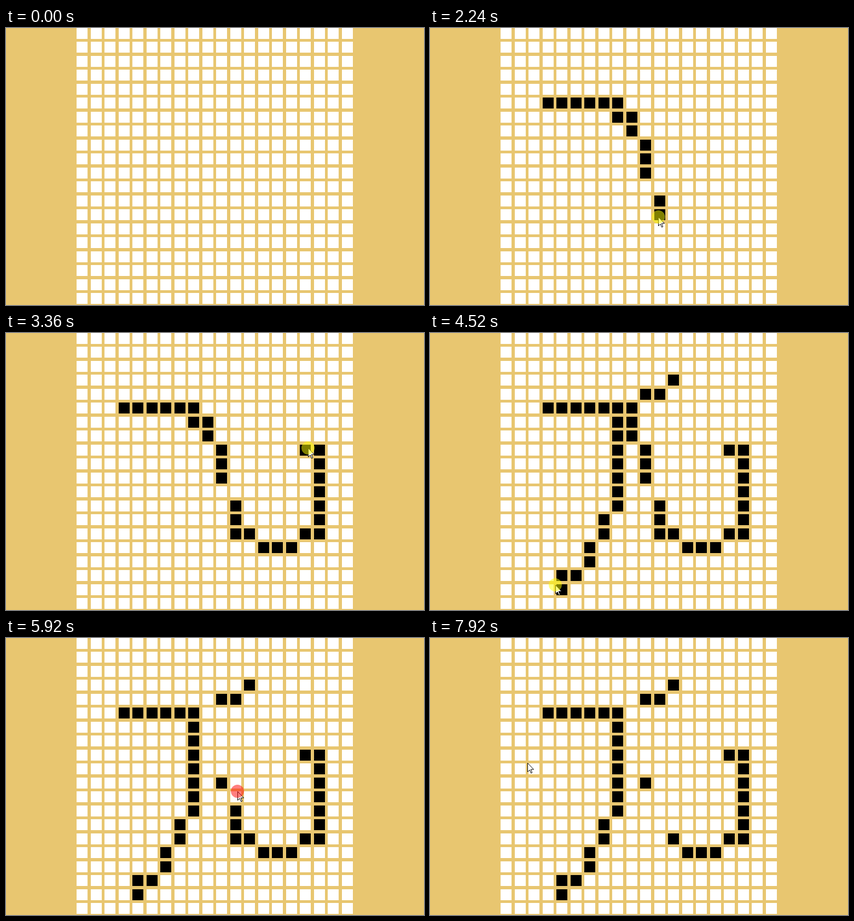
These frames come from a looping animation (764 by 506 pixels, 8 s). An HTML page with a canvas:

```html
<!DOCTYPE html>
<html lang="en">
<head>
<meta charset="utf-8">
<title>Pixel drawing</title>
<style>
  html, body { margin: 0; width: 100%; height: 100%; overflow: hidden; background: #e8c670; }
  canvas { display: block; }
</style>
</head>
<body>
<canvas id="stage" width="764" height="506"></canvas>
<script>
const ctx = document.getElementById('stage').getContext('2d');
const LOOP = 8000, TICK = 40, SAMPLE = 4;
const COUNT = 20, PITCH = 25.5, SIZE = 20, LEFT = 129.2, TOP = -0.4;

const pen = { fill: '#000', glow: 'rgba(255,255,0,.5)' };
const eraser = { fill: '#fff', glow: 'rgba(255,0,0,.5)' };

// Pointer legs in grid units: whole numbers are cell centres. The pointer rests between legs.
const legs = [
  { from: 240, to: 1040, power: 2, d: 'M18.8 17.9Q12 12 3.13 5.27' },
  { from: 1400, to: 1600, tool: pen, d: 'M3.13 5.27L5.03 4.8' },
  { from: 1600, to: 2240, tool: pen,
    d: 'M5.03 4.8L8 5L8.3 6L9.3 7L9.8 8L10.35 10L10.5 11.5L10.91 13.15' },
  { from: 2240, to: 3360, tool: pen, power: 1.3,
    d: 'M10.91 13.15L11.1 14L12 14.25L13 14.9L15 14.8L16 14L17.2 13.8L17.35 10L17.2 8L16.19 7.86' },
  { from: 3400, to: 4060, d: 'M16.19 7.86Q12 3 9.8 2.6L12.1 3.1' },
  { from: 4060, to: 4520, tool: pen,
    d: 'M12.1 3.1L11 4L10 4.2L8 6V12L7 13V14L6 15V16L5 17L4 17.3V17.75L3.52 17.66' },
  { from: 4600, to: 4800, d: 'M3.52 17.66L6.23 8.21' },
  { from: 4800, to: 5160, d: 'M6.23 8.21Q7.5 3.3 9 3.3' },
  { from: 5160, to: 5920, tool: eraser, d: 'M9 3.3L9.05 7.2L9.8 8.3L10.1 9.1L11.13 10.6' },
  { from: 5920, to: 6400, tool: eraser, d: 'M11.13 10.6L11 14' },
  { from: 6480, to: 7400, d: 'M11 14Q6 10.5 .42 9.66L.97 9.43' },
  { from: 7440, to: 7920, d: 'M.97 9.43L1.52 8.56' }
];

for (const leg of legs) {
  leg.track = document.createElementNS('http://www.w3.org/2000/svg', 'path');
  leg.track.setAttribute('d', leg.d);
  leg.length = leg.track.getTotalLength();
}

const legAt = t => legs.findLast(leg => leg.from <= t);

function positionOn(leg, t) {
  const k = Math.min(1, (t - leg.from) / (leg.to - leg.from));
  return leg.track.getPointAtLength(leg.length * (1 - (1 - k) ** (leg.power || 1)));
}

// A cell changes when a pressed pointer is over it; the gaps between cells do not react.
const edits = [];
const inCell = v => Math.abs(v - Math.round(v)) <= SIZE / PITCH / 2;
for (let t = legs[0].from; t < LOOP; t += SAMPLE) {
  const leg = legAt(t);
  if (!leg.tool) continue;
  const { x, y } = positionOn(leg, t);
  if (inCell(x) && inCell(y))
    edits.push({ time: t, cell: Math.round(y) * COUNT + Math.round(x), fill: leg.tool.fill });
}

const arrow = new Path2D('M.5 .5V16.5L4.1 13.1L6.6 18.9L8.7 18L6.3 12.1H11.5Z');

function drawPointer(t) {
  const leg = legAt(t);
  if (!leg) return;
  const grid = positionOn(leg, t);
  const x = LEFT + SIZE / 2 + grid.x * PITCH;
  const y = TOP + SIZE / 2 + grid.y * PITCH;
  ctx.save();
  ctx.translate(Math.round(x), Math.round(y));
  ctx.fillStyle = '#fff';
  ctx.strokeStyle = '#000';
  ctx.fill(arrow);
  ctx.stroke(arrow);
  ctx.restore();
  if (!leg.tool) return;
  ctx.fillStyle = leg.tool.glow;
  ctx.beginPath();
  ctx.arc(x, y, 12, 0, Math.PI * 2);
  ctx.fill();
}

function draw(t) {
  ctx.fillStyle = '#e8c670';
  ctx.fillRect(0, 0, 764, 506);
  const fills = Array(COUNT * COUNT).fill('#fff');
  for (const edit of edits)
    if (edit.time <= t) fills[edit.cell] = edit.fill;
  fills.forEach((fill, i) => {
    ctx.fillStyle = fill;
    const x = LEFT + (i % COUNT) * PITCH, y = TOP + Math.floor(i / COUNT) * PITCH;
    ctx.fillRect(Math.round(x), Math.round(y), SIZE, SIZE);
  });
  drawPointer(t);
}

const start = performance.now();
function frame() {
  const t = (performance.now() - start) % LOOP;
  draw(Math.floor(t / TICK) * TICK);
  requestAnimationFrame(frame);
}
frame();
</script>
</body>
</html>
```
